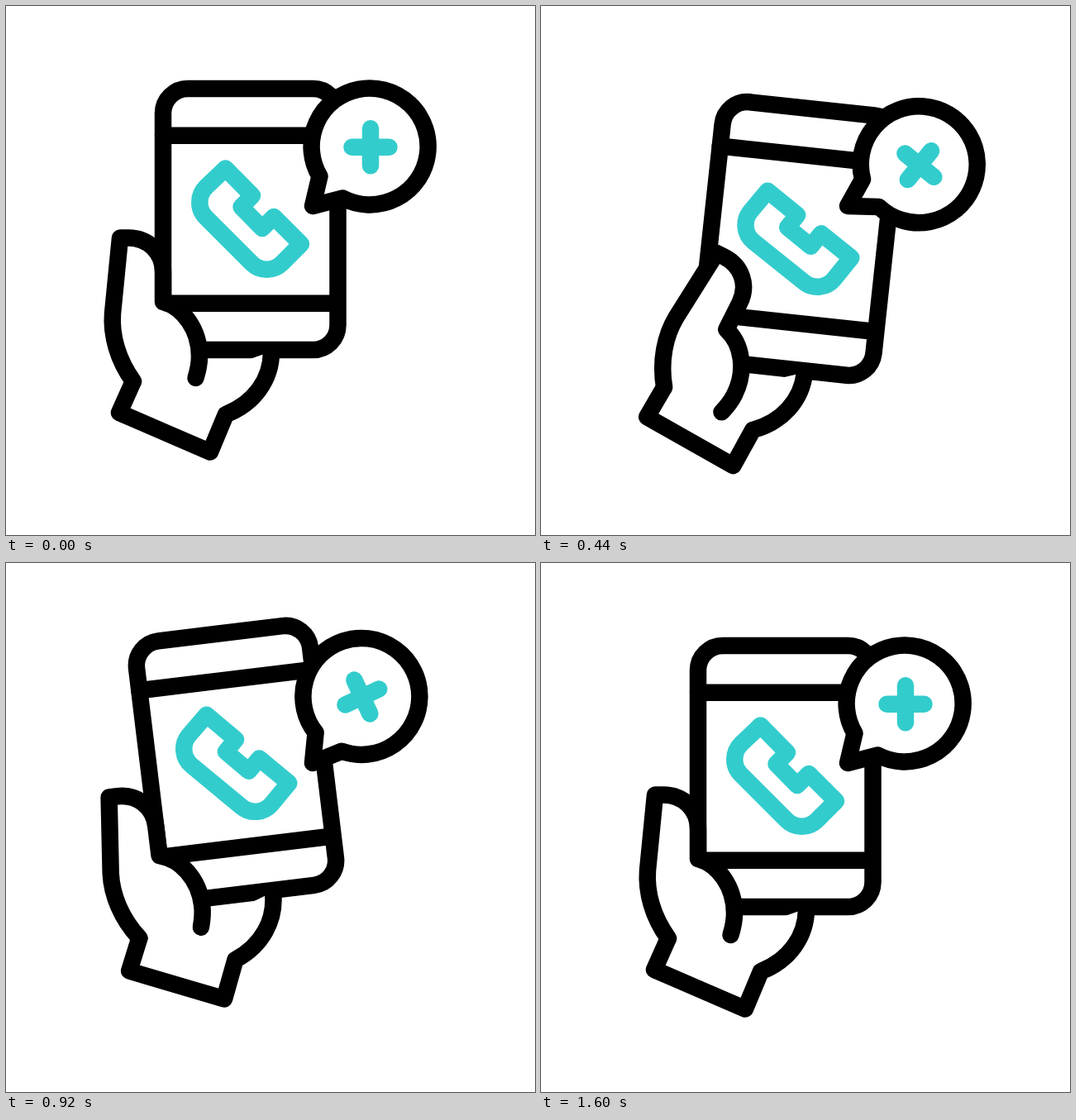
Animation, 640 px wide and 640 px high, one loop 1680 ms. Source, as an HTML page:

```html
<!DOCTYPE html>
<html lang="en">
<head>
<meta charset="utf-8">
<title>Call for help</title>
<style>
  html, body { margin: 0; width: 100%; height: 100%; overflow: hidden; background: #fff; }
  svg { display: block; width: 100vw; height: 100vh; }
  path, rect { fill: #fff; stroke: #000; stroke-width: 20.5; stroke-linecap: round; stroke-linejoin: round; }
  .teal { stroke: #3cc; }
</style>
</head>
<body>
<svg viewBox="0 0 640 640">
  <g id="body">
    <rect x="190" y="100" width="211.5" height="316" rx="30"/>
    <path d="M190 156.7H401M190 359.8H401"/>
    <path id="handset" class="teal" d="M265.5 196.5L242 219A26 26 0 0 0 242 256L297 311A26 26 0 0 0 334 311L357 288L324 255L310 269L284.5 243L298 229.5Z"/>
    <path d="M154 454L137 492L247 539.5L266 494C300 481 321 452 321 418L229.5 450" stroke="none" style="stroke:none"/>
    <path d="M154 454L137 492L247 539.5L266 494C300 481 321 452 321 418" style="fill:none"/>
    <path id="thumb" d="M154 454C135 428 127 398 129 372L138 280.5H148C172 280.5 190 298 190 322V358C215 365 234 392 234 424C234 434 232 442 229.5 450"/>
  </g>
  <g id="bubble">
    <path d="M371 242L379.5 206A70.5 70.5 0 1 1 407.5 232.5Z"/>
    <path id="plus" class="teal" d="M418.5 170.7H463.5M441 148.2V193.2"/>
  </g>
</svg>
<script>
  const LOOP = 1680, STEP = 40;

  // Each track: [time in ms, value], eased between neighbours
  const tracks = {
    lift:    [[60, 0], [395, 25.5], [720, -29], [1170, 0]],
    tilt:    [[80, 0], [460, 6.2], [800, -9.2], [1170, 0]],
    thumb:   [[80, 0], [480, 21], [900, 0]],
    handset: [[80, 0], [265, 12.5], [435, -12.5], [610, 6.5], [775, -6], [945, 2], [1160, 0]],
    bubble:  [[200, 0], [522, 19], [880, -8], [1280, 3.9], [1600, 0]]
  };

  const smooth = u => u * u * (3 - 2 * u);
  const smoother = u => u * u * u * (u * (6 * u - 15) + 10);
  const clamp = u => Math.min(1, Math.max(0, u));

  function at(name, t) {
    const keys = tracks[name];
    let value = keys[0][1];
    for (let i = 1; i < keys.length; i++) {
      const [t0, a] = keys[i - 1], [t1, b] = keys[i];
      if (t >= t0) value = a + (b - a) * smooth(clamp((t - t0) / (t1 - t0)));
    }
    return value;
  }

  const parts = {};
  for (const id of ['body', 'handset', 'thumb', 'bubble', 'plus'])
    parts[id] = document.getElementById(id);

  function turn(id, angle, x, y, dy = 0) {
    parts[id].setAttribute('transform',
      `translate(0 ${dy.toFixed(3)}) rotate(${angle.toFixed(3)} ${x} ${y})`);
  }

  function draw(t) {
    turn('body', at('tilt', t), 295.5, 401, at('lift', t));
    turn('handset', at('handset', t), 295.5, 258);
    turn('thumb', at('thumb', t), 154, 454);
    turn('bubble', at('bubble', t), 371, 242);
    turn('plus', 180 * smoother(clamp((t - 170) / 990)), 441, 170.7);
  }

  const start = performance.now();
  function tick() {
    const t = (performance.now() - start) % LOOP;
    draw(Math.floor(t / STEP) * STEP);
    requestAnimationFrame(tick);
  }
  draw(0);
  requestAnimationFrame(tick);
</script>
</body>
</html>
```
